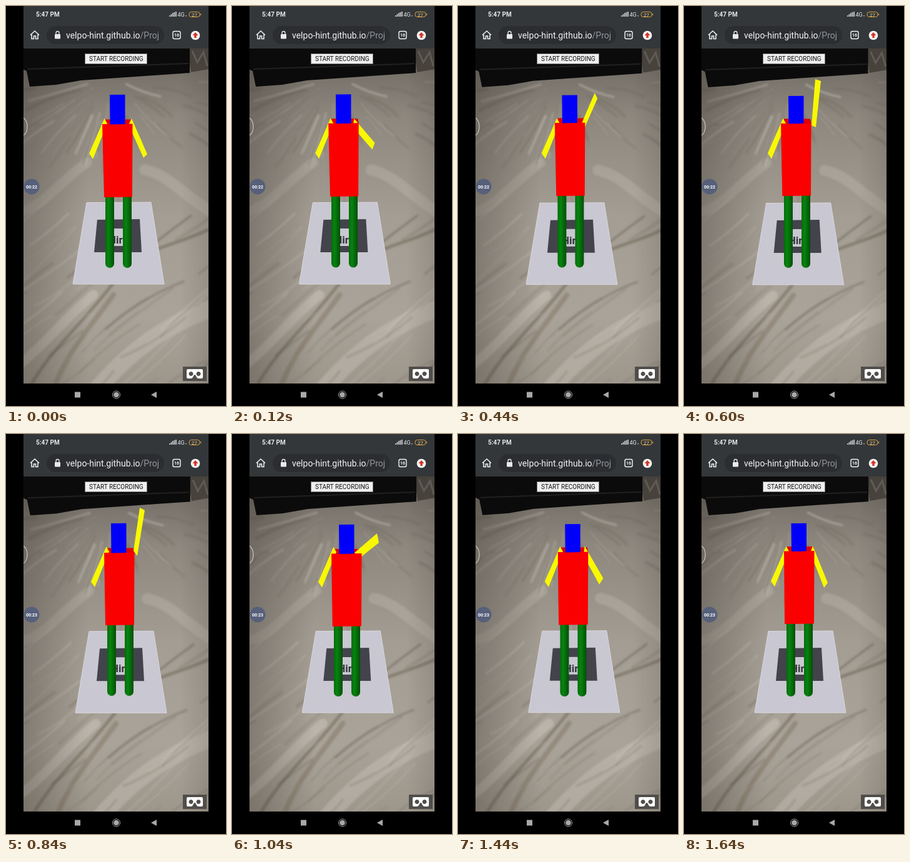
Recreate the animation shown at these times as an HTML page. Size 352 by 640 pixels, loop 1.68 s.

```html
<!DOCTYPE html>
<html lang="en">
<head>
<meta charset="utf-8">
<title>AR figure waving</title>
<style>
  html, body { margin: 0; width: 100%; height: 100%; overflow: hidden; background: #000; }
  svg { display: block; width: 352px; height: 640px; }
  text { font-family: Roboto, sans-serif; }
</style>
</head>
<body>
<svg viewBox="0 0 352 640" width="352" height="640">
  <defs>
    <linearGradient id="floorTone" x1="0" y1="0" x2="0" y2="1">
      <stop offset="0" stop-color="#69645d"/>
      <stop offset=".2" stop-color="#8d877e"/>
      <stop offset=".5" stop-color="#a39d93"/>
      <stop offset=".8" stop-color="#aaa399"/>
      <stop offset="1" stop-color="#9d968b"/>
    </linearGradient>
    <linearGradient id="shade">
      <stop offset="0" stop-color="#38332d" stop-opacity=".35"/>
      <stop offset=".35" stop-color="#38332d" stop-opacity="0"/>
      <stop offset=".85" stop-color="#38332d" stop-opacity="0"/>
      <stop offset="1" stop-color="#38332d" stop-opacity=".15"/>
    </linearGradient>
    <linearGradient id="legTone">
      <stop offset="0" stop-color="#046c08"/>
      <stop offset=".35" stop-color="#078310"/>
      <stop offset="1" stop-color="#034f06"/>
    </linearGradient>
    <filter id="soft" x="-10%" y="-10%" width="120%" height="120%"><feGaussianBlur stdDeviation="1.6"/></filter>
    <clipPath id="view"><path d="M28 68H324V604H28z"/></clipPath>
  </defs>

  <rect width="352" height="640" fill="#000"/>

  <g clip-path="url(#view)">
    <rect x="28" y="68" width="296" height="536" fill="url(#floorTone)"/>
    <g id="floor" fill="none" stroke-linecap="round">
      <g id="veins" filter="url(#soft)">
        <path d="M30 625C62 558 112 520 168 448S260 392 340 350" stroke="#6d6051" stroke-width="5" opacity=".5"/>
        <path d="M72 625C92 560 130 520 172 462" stroke="#75664f" stroke-width="8" opacity=".38"/>
        <path d="M20 575C65 540 92 500 140 462" stroke="#d0cbc1" stroke-width="15" opacity=".45"/>
        <path d="M140 620C190 560 250 510 335 482" stroke="#cbc6bc" stroke-width="28" opacity=".4"/>
        <path d="M20 330C60 322 82 284 130 250" stroke="#c3bdb2" stroke-width="16" opacity=".35"/>
        <path d="M222 262C262 270 290 310 335 332" stroke="#c3bdb2" stroke-width="18" opacity=".35"/>
      </g>
    </g>
    <rect x="28" y="68" width="296" height="536" fill="url(#shade)"/>
    <g id="cabinet">
      <path d="M290 60H330V100L296 106z" fill="#47423c"/>
      <path d="M298 72L306 90L316 74L322 96" fill="none" stroke="#79746c" stroke-width="3" opacity=".5"/>
      <path d="M20 60H294V107L120 119L80 126L38 129L33 104L20 98z" fill="#0c0b0b"/>
      <path d="M34 101L292 92" stroke="#23201f" stroke-width="2"/>
    </g>
    <g id="paper">
      <path d="M129 314.5L232 314L253 445L107 445z" fill="#c9c7d1" stroke="#dad8de"/>
      <path d="M146 342L214 341L217 394L141 394z" fill="#43434c"/>
      <path d="M163 356H197L199 384H161z" fill="#cac8d2"/>
      <text x="180" y="380" font-size="17" font-weight="700" text-anchor="middle" fill="#34343b">Hiro</text>
    </g>
    <g id="legs" fill="url(#legTone)">
      <rect x="159" y="290" width="14" height="129" rx="7"/>
      <rect x="187" y="290" width="14" height="129" rx="7"/>
    </g>
    <path id="top" fill="#e00000"/>
    <path id="restArm" d="M157.500 180L162 188L139 245L133 236z" fill="#f8f800"/>
    <path id="arm" fill="#f8f800"/>
    <path id="torso" fill="#fa0000"/>
    <path id="head" fill="#0000fa"/>

    <path d="M28 179Q34 183 34 193T28 207" fill="none" stroke="#d8d6d2" stroke-width="1.5" opacity=".7"/>
    <circle cx="41" cy="289" r="12.500" fill="#56607a"/>
    <text id="clock" x="41" y="291.500" font-size="7" font-weight="700" text-anchor="middle" fill="#fff"></text>

    <rect x="126.500" y="76.500" width="99" height="16" fill="#efefef" stroke="#777"/>
    <text x="176.300" y="88" font-size="10" text-anchor="middle" fill="#111">START RECORDING</text>

    <rect x="283" y="577" width="38" height="23" fill="#504d4a"/>
    <path fill="#fff" fill-rule="evenodd" d="M291 581H313Q315 581 315 583V594Q315 596 313 596H308Q306 596 305 594L303.500 591Q302 589 300.500 591L299 594Q298 596 296 596H291Q289 596 289 594V583Q289 581 291 581z
      M296 585a3.500 3.500 0 1 0 .01 0z M308 585a3.500 3.500 0 1 0 .01 0z"/>
  </g>

  <path d="M28 0H324V68H28z" fill="#34373a"/>
  <text x="48" y="17" font-size="10" font-weight="700" fill="#e4e6e8">5:47 PM</text>
  <path d="M262 17v-2M264.500 17v-4M267 17v-6M269.500 17v-7M272 17v-8" stroke="#dfe1e3" stroke-width="1.500"/>
  <text x="274.500" y="17" font-size="9" fill="#e4e6e8">4G</text>
  <path d="M286.500 15l1.500 2l1.500-2z" fill="#aaa"/>
  <rect x="293" y="9.500" width="17" height="8" rx="3.500" fill="none" stroke="#d9a441"/>
  <path d="M311.500 12v3" stroke="#d9a441"/>
  <text x="301.500" y="16.500" font-size="8" text-anchor="middle" fill="#f0d08c">27</text>

  <path d="M39 46.500L46 40L53 46.500M41 45.500V52.500H44.500V48H47.500V52.500H51V45.500" fill="none" stroke="#f1f3f4" stroke-width="1.500"/>
  <rect x="65" y="32" width="188" height="29" rx="14.500" fill="#2b2d30"/>
  <rect x="78" y="45" width="9" height="7.500" rx="1" fill="#e8eaed"/>
  <path d="M80 45V43a2.500 2.500 0 0 1 5 0V45" fill="none" stroke="#e8eaed" stroke-width="1.300"/>
  <text x="96" y="52" font-size="14" fill="#f1f3f4">velpo-hint.github.io<tspan fill="#92969b">/Proj</tspan></text>
  <rect x="267" y="40.500" width="12" height="12" rx="2.500" fill="none" stroke="#f1f3f4" stroke-width="1.400"/>
  <text x="273" y="49.200" font-size="7" font-weight="700" text-anchor="middle" fill="#f1f3f4">16</text>
  <circle cx="303" cy="47" r="7.300" fill="#f4f4f4"/>
  <path d="M303 42L307.500 47H304.700V51H301.300V47H298.500z" fill="#d93025"/>

  <rect x="110" y="617.500" width="9" height="9" fill="#a9a9a9"/>
  <circle cx="176.500" cy="622" r="6" fill="none" stroke="#a9a9a9"/>
  <circle cx="176.500" cy="622" r="4.300" fill="#a9a9a9"/>
  <path d="M232 622L241 617V627z" fill="#a9a9a9"/>
</svg>

<script>
const LOOP = 1680, STEP = 40;
const $ = id => document.getElementById(id);

// time, torso x / top / bottom, head x / top, leg shift x / y, paper shift x / y
const drift = [
  [0,    154, 189, 306, 166, 142, 0, 0, 0, 0],
  [240,  154.5, 186.5, 304, 166, 141, 0, -1, 1, 0.3],
  [600,  155, 188, 304, 167, 144, 1, 0, 2.7, 1],
  [840,  157, 190, 306, 168, 143, 3, 0, 4, 1.3],
  [1040, 159, 191.5, 308, 171, 145, 4, 1, 5.3, 1],
  [1280, 159.5, 190.5, 307, 171, 145, 4, 1, 5.5, 0.5],
  [1640, 160, 187.5, 304, 171.5, 143, 5, 1, 6, 1]
];
// time, then the four corners of the waving arm
const wave = [
  [0,    201, 180, 226, 237, 220, 243, 196, 190],
  [240,  190, 181, 231, 189, 229, 205, 190, 197],
  [600,  204, 191, 210, 117, 219, 120, 211, 194],
  [840,  204, 187, 214, 118, 222, 122, 210, 195],
  [1040, 196, 190, 232, 159, 235, 174, 206, 197],
  [1280, 199, 180, 234, 218, 229, 231, 200, 198],
  [1640, 206, 179, 230, 238, 224, 246, 202, 190]
];

// monotone cubic through the rows of a table
function sample(rows, t) {
  const last = rows.length - 1;
  let i = 0;
  while (i < last - 1 && t >= rows[i + 1][0]) i++;
  const slope = (k, c) => (rows[k + 1][c] - rows[k][c]) / (rows[k + 1][0] - rows[k][0]);
  const tangent = (k, c) => {
    if (k === 0 || k === last) return 0;
    const a = slope(k - 1, c), b = slope(k, c);
    return a * b <= 0 ? 0 : 2 * a * b / (a + b);
  };
  const p = rows[i], q = rows[i + 1], h = q[0] - p[0];
  const u = Math.min(1, (t - p[0]) / h), v = 1 - u;
  return p.slice(1).map((a, n) => {
    const c = n + 1;
    return a * v * v * (1 + 2 * u) + q[c] * u * u * (3 - 2 * u)
      + h * u * v * (v * tangent(i, c) - u * tangent(i + 1, c));
  });
}

const poly = (id, pts) => $(id).setAttribute('d', 'M' + pts.map(n => n.toFixed(2)).join(' ') + 'z');
const shift = (id, x, y) => $(id).setAttribute('transform', `translate(${x.toFixed(2)} ${y.toFixed(2)})`);

function addVeins() {
  let seed = 29;
  const rnd = (a, b) => {
    seed = (seed * 16807) % 2147483647;
    return a + (b - a) * seed / 2147483647;
  };
  const tones = ['#cfc9be', '#bdb7ac', '#5f574d', '#74695a'];
  const vein = (x, y, dx, dy, bend) => {
    const p = document.createElementNS('http://www.w3.org/2000/svg', 'path');
    p.setAttribute('d', `M${x} ${y}q${dx / 2} ${dy / 2 + bend} ${dx} ${dy}`);
    p.setAttribute('stroke', tones[Math.floor(rnd(0, 4))]);
    p.setAttribute('stroke-width', rnd(1, 5));
    p.setAttribute('opacity', rnd(.15, .42));
    $('veins').append(p);
  };
  for (let i = 0; i < 48; i++) {
    const a = rnd(.05, 3.09), r = rnd(25, 170), len = rnd(35, 100);
    const cx = Math.cos(a), cy = Math.sin(a) * .9;
    vein(165 + cx * r, 115 + cy * r, cx * len, cy * len, rnd(-9, 9));
  }
  for (let i = 0; i < 40; i++) {
    const len = rnd(45, 130);
    vein(rnd(-20, 310), rnd(350, 640), len, -len * rnd(.6, 1), rnd(-16, 16));
  }
}

function draw(t) {
  const [x, top, low, hx, hy, lx, ly, px, py] = sample(drift, t);
  const lean = 3 - 2 * t / LOOP;
  shift('floor', px, py);
  shift('cabinet', px * .2, py);
  shift('paper', px, py);
  shift('legs', lx, ly);
  shift('restArm', x - 154, (top - 189) * .3);
  poly('top', [x + 5, top - 7.5, x + 47, top - 7.5, x + 49, top + 2, x, top + 2]);
  poly('torso', [x, top, x + 48.5, top - .5, x + 48, low - .5, x + lean, low]);
  poly('head', [hx, hy, hx + 24.5, hy - .2, hx + 24.5, top, hx + .5, top + .5]);
  poly('arm', sample(wave, t));
  $('clock').textContent = t < 720 ? '00:22' : '00:23';
}

addVeins();
const start = performance.now();
function tick() {
  const t = (performance.now() - start) % LOOP;
  draw(Math.floor(t / STEP) * STEP);
  requestAnimationFrame(tick);
}
tick();
</script>
</body>
</html>
```
